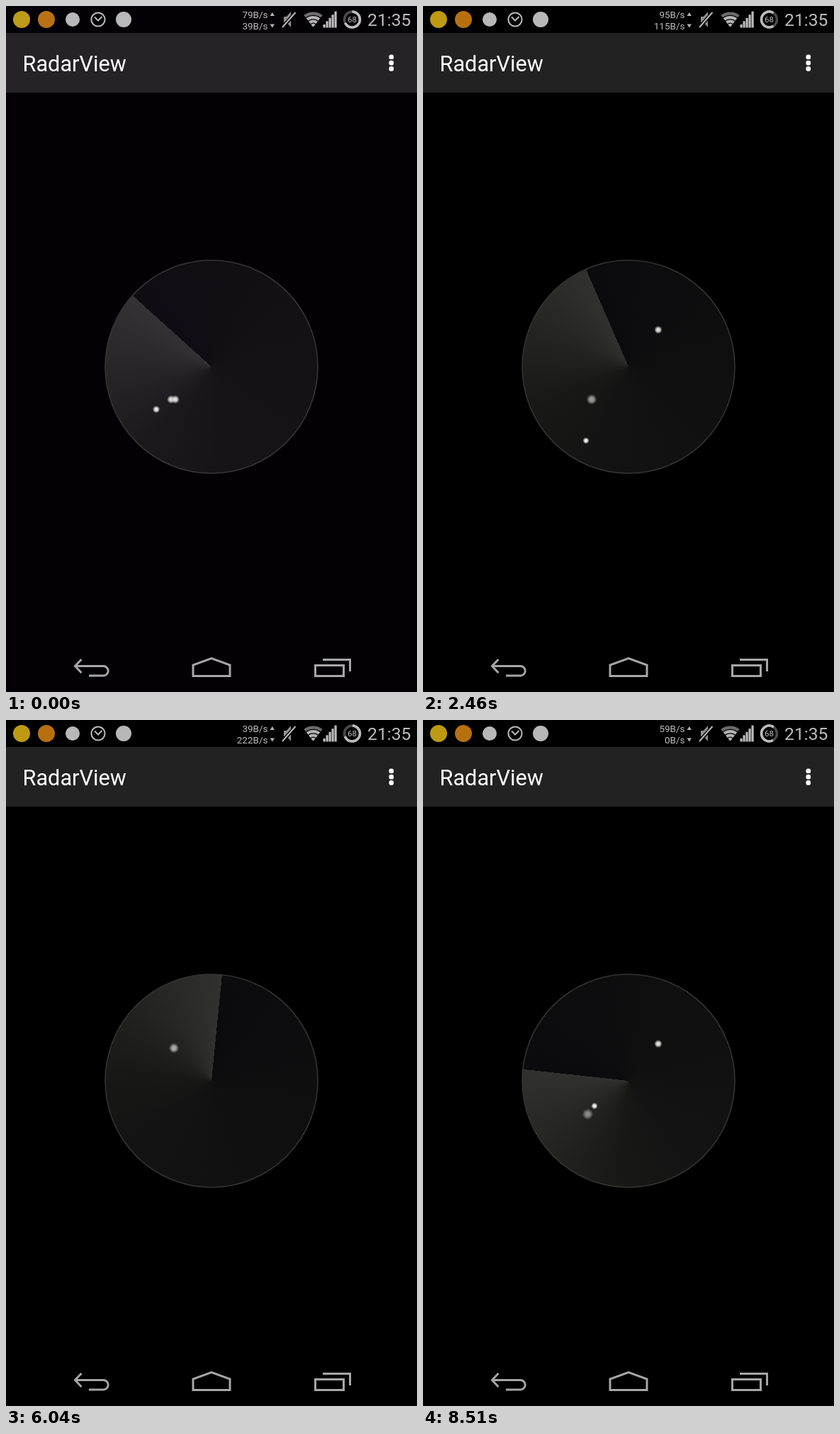
Animation of 580x966 px, one loop 8.53 s. Source, as an HTML page:

```html
<!DOCTYPE html>
<html lang="en">
<head>
<meta charset="utf-8">
<title>RadarView</title>
<style>
  html, body { margin: 0; width: 100%; height: 100%; overflow: hidden; background: #000; }
  #stage { position: relative; width: 580px; height: 966px; overflow: hidden; background: #000; }
  #stage > * { position: absolute; left: 0; top: 0; }
  #stage > .sweep {
    left: 140px; top: 358px; width: 300px; height: 300px; border-radius: 50%;
    background: conic-gradient(from 90deg, #0b0b0d, #0f0f10 110deg, #131313 225deg,
      #181817 270deg, #242423 315deg, #313130);
  }
  #tint { width: 580px; height: 966px; background: #040106; mix-blend-mode: screen; }
  text { font-family: Roboto, sans-serif; fill: #bcbcbc; }
  .speed { font-size: 13.5px; text-anchor: end; }
</style>
</head>
<body>
<div id="stage">
  <div class="sweep" id="sweep"></div>
  <svg width="580" height="966" viewBox="0 0 580 966">
    <defs>
      <radialGradient id="glow">
        <stop offset=".35" stop-color="#f2f2ee"/>
        <stop offset=".65" stop-color="#c8c8c4" stop-opacity=".7"/>
        <stop offset="1" stop-color="#aaa" stop-opacity="0"/>
      </radialGradient>
    </defs>

    <!-- action bar -->
    <rect y="38" width="580" height="84" fill="#222223"/>
    <text x="23.5" y="92" font-size="30.7" style="fill: #fff">RadarView</text>
    <g id="menu" fill="#fff"></g>

    <!-- status bar -->
    <circle cx="22" cy="19" r="12" fill="#bd9a12"/>
    <circle cx="57" cy="19" r="12" fill="#b8700f"/>
    <circle cx="94" cy="19" r="10" fill="#b8b8b8"/>
    <circle cx="166" cy="19" r="11" fill="#b8b8b8"/>
    <g fill="none" stroke="#b8b8b8" stroke-width="2">
      <circle cx="130" cy="19" r="9.6"/>
      <path d="M125 15.5L130 20.5L135.5 15"/>
    </g>
    <text class="speed" id="up" x="369.5" y="17"></text>
    <text class="speed" id="down" x="369.5" y="32.500"></text>
    <path d="M372.5 14h6.500l-3.200-5zM372.500 25.500h6.500l-3.200 5z" fill="#b4b4b4"/>
    <path d="M392 15h4l6-7v22l-6-7h-4z" fill="#909090"/>
    <path d="M409 9L390 30" stroke="#000" stroke-width="5"/>
    <path d="M408.5 9L390 30" stroke="#b8b8b8" stroke-width="2"/>
    <g id="wifi" fill="none" stroke-width="4.2"></g>
    <g id="bars" fill="#bcbcbc"></g>
    <g fill="none" stroke-width="3.5">
      <circle cx="488.5" cy="19" r="11" stroke="#4a4a4a"/>
      <circle id="ring" cx="488.5" cy="19" r="11" stroke="#bcbcbc" pathLength="100" stroke-dasharray="68 32"/>
    </g>
    <text x="488.5" y="23.2" font-size="11.5" text-anchor="middle">68</text>
    <text x="571.5" y="28" font-size="24.7" text-anchor="end">21:35</text>

    <!-- radar rim and blips -->
    <circle cx="290" cy="508" r="150" fill="none" stroke="#333332" stroke-width="1.6"/>
    <g id="blips" fill="url(#glow)"></g>

    <!-- navigation bar -->
    <g fill="none" stroke="#a6a6a6" stroke-width="3">
      <path d="M106.5 920L97.5 929.5L106.5 939M98 929.5H137.5a6.7 6.7 0 0 1 0 13.4H117"/>
      <path d="M264 943.5V928L290 918.5L316 928V943.5Z"/>
      <path d="M436.5 928.5H476.5V943.5H436.5ZM447 920.5H485.5V937"/>
    </g>
  </svg>
  <div id="tint"></div>
</div>
<script>
const LOOP = 8530, LIFE = 950, READING = 1600;
const $ = id => document.getElementById(id);
const range = n => [...Array(n).keys()];

// Key poses of the sweep: ms, degrees, redraws until the next pose.
const poses = [
  [0, 222, 2], [320, 260, 1], [800, 316, 3], [970, 336, 13], [1670, 504, 21],
  [2460, 606.4, 28], [3840, 737.6, 56], [6040, 995.7, 34], [7560, 1151.7, 24],
  [8510, 1266.2, 1], [LOOP, 1266.2, 1]
];

// Blips: x, y, birth ms. Each one swells and fades over LIFE.
const blips = [
  [233, 554, -330], [239, 554, -330], [212, 568, -200], [232, 444, 680],
  [332, 456, 2180], [238, 554, 1850], [230, 612, 2370],
  [213, 473, 3500], [238, 554, 3210], [237, 462, 5480],
  [332, 456, 6900], [392.5, 547, 7440], [338, 615.5, 6980],
  [332, 456, 8230], [242, 543.5, 8400], [232.5, 555, 7830]
];

const readings = [
  "79B/s 39B/s", "95B/s 115B/s", "1.9KB/s 1KB/s",
  "39B/s 222B/s", "235B/s 140B/s", "59B/s 0B/s"
];

function add(parent, tag, attrs) {
  const el = document.createElementNS("http://www.w3.org/2000/svg", tag);
  for (const key in attrs) el.setAttribute(key, attrs[key]);
  return $(parent).appendChild(el);
}

range(3).forEach(i =>
  add("menu", "rect", { x: 540.5, y: 68.5 + i * 8.3, width: 6.6, height: 6.6, rx: 2.6 }));

range(4).forEach(i => {
  const r = 3 + i * 5.5, dx = r * 0.61, y = 30 - r * 0.79;
  add("wifi", "path", {
    d: `M${433.5 - dx} ${y}A${r} ${r} 0 0 1 ${433.5 + dx} ${y}`,
    stroke: i < 3 ? "#b4b4b4" : "#6c6c6c"
  });
});

range(5).forEach(i =>
  add("bars", "rect", { x: 447.5 + i * 4, y: 26 - i * 4.6, width: 3.2, height: 4.5 + i * 4.6 }));

const dots = blips.map(([cx, cy]) => add("blips", "circle", { cx, cy }));

// Time and angle of the latest redraw.
function lastRedraw(t) {
  const next = poses.findIndex(([at]) => at > t);
  const [t0, a0, redraws] = poses[next - 1];
  const [t1, a1] = poses[next];
  const p = Math.floor((t - t0) / (t1 - t0) * redraws) / redraws;
  return { time: t0 + (t1 - t0) * p, angle: a0 + (a1 - a0) * p };
}

function draw(t) {
  const { time, angle } = lastRedraw(t);
  $("sweep").style.transform = `rotate(${angle}deg)`;
  $("ring").setAttribute("transform", `rotate(${time * 0.06 - 90} 488.5 19)`);

  dots.forEach((dot, i) => {
    const p = (time - blips[i][2]) / LIFE;
    const alive = p >= 0 && p < 1;
    dot.setAttribute("r", alive ? 4.3 + 5 * p : 0);
    dot.setAttribute("opacity", alive ? 1 - p * p : 0);
  });

  const [up, down] = readings[Math.floor(t / READING)].split(" ");
  $("up").textContent = up;
  $("down").textContent = down;
  $("tint").style.opacity = Math.max(0, 1 - time / 800);
}

const start = performance.now();
function loop() {
  draw((performance.now() - start) % LOOP);
  requestAnimationFrame(loop);
}
loop();
</script>
</body>
</html>
```
